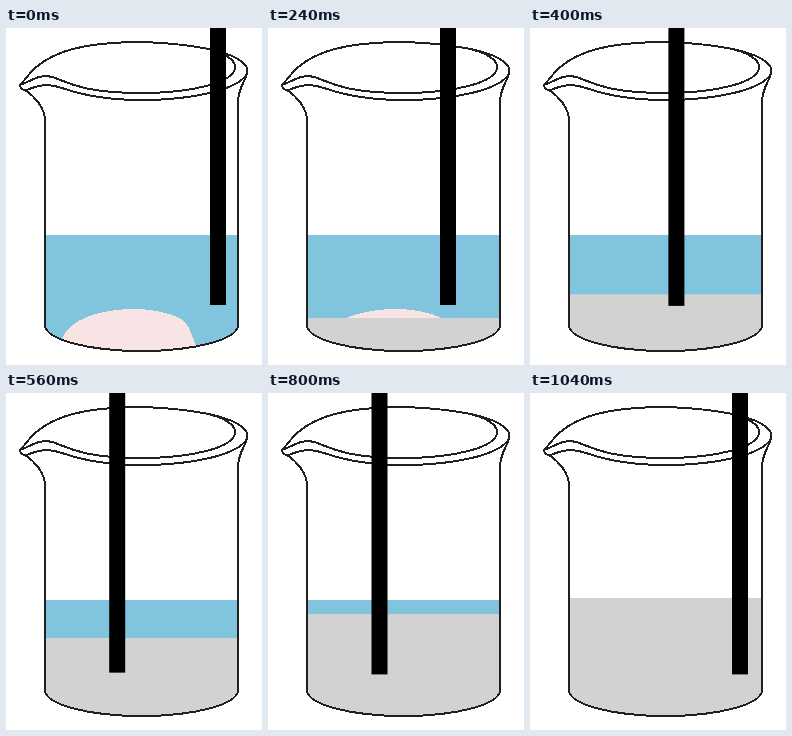
An HTML page without scripts that plays this animation: 256 px wide and 337 px high, repeating every 1.12 s.

```html
<!DOCTYPE html>
<html lang="en">
<head>
<meta charset="utf-8">
<title>Beaker</title>
<style>
  html, body { margin: 0; width: 100%; height: 100%; overflow: hidden; background: #fff; }
  svg { display: block; width: 256px; height: 337px; shape-rendering: crispEdges; }
  .glass { fill: none; stroke: #231f20; stroke-width: 2; stroke-linecap: round; stroke-linejoin: round; }
  .rod { animation: stir 1.12s infinite; }
  .sediment { fill: #d2d2d2; animation: rise 1.12s infinite; }

  /* 14 ticks per loop; steps(n) moves evenly over n ticks */
  @keyframes stir {
    0% { transform: translate(204px, 277px); animation-timing-function: steps(2); }
    14.28% { transform: translate(188px, 277px); animation-timing-function: steps(2); }
    28.57% { transform: translate(156px, 277px); animation-timing-function: steps(5); }
    64.28% { transform: translate(68px, 281.4px); animation-timing-function: steps(2); }
    78.57% { transform: translate(139px, 281.4px); animation-timing-function: steps(2); }
    92.85%, 100% { transform: translate(202px, 281.4px); }
  }
  @keyframes rise {
    0% { transform: translateY(324px); animation-timing-function: steps(2); }
    14.28% { transform: translateY(303px); animation-timing-function: steps(2); }
    28.57% { transform: translateY(277px); animation-timing-function: steps(3); }
    50% { transform: translateY(245px); animation-timing-function: steps(4); }
    78.57% { transform: translateY(213px); animation-timing-function: steps(2); }
    92.85%, 100% { transform: translateY(205px); }
  }
</style>
</head>
<body>
<svg viewBox="0 0 256 337">
  <defs>
    <clipPath id="body">
      <path d="M39 90V297A96.5 26 0 0 0 232 297V90Z"/>
    </clipPath>
  </defs>

  <g clip-path="url(#body)">
    <rect x="39" y="207" width="193" height="120" fill="#80c4de"/>
    <path fill="#f8e4e4" d="M55 330L57 309C62 293 92 281 128 281C150 281 171 287 178 293C184 299 186 308 190 318V330Z"/>
    <rect class="sediment" x="39" width="193" height="130"/>
  </g>

  <g class="glass">
    <!-- walls and neck -->
    <path d="M39 93V297A96.5 26 0 0 0 232 297V75"/>
    <path d="M19 62C28 68 39 79 39 93M241 46C238 55 232 61 232 75"/>
    <!-- outer and inner rim -->
    <path d="M15 56C22 49 28 34 60 23C88 14 128 13 156 15C195 18 234 25 241 40Q242 43 241 46C231 62 187 72 135 72C105 72 76 67 56 60C42 55 33 57 26 60Q17 64 15 60Q13 57 16 55"/>
    <path d="M17 56C26 52 34 46 46 49C58 52 72 65 135 65C184 65 229 55 229 39C229 31 217 24 198 20"/>
  </g>

  <rect class="rod" y="-300" width="16" height="300"/>
</svg>
</body>
</html>
```
